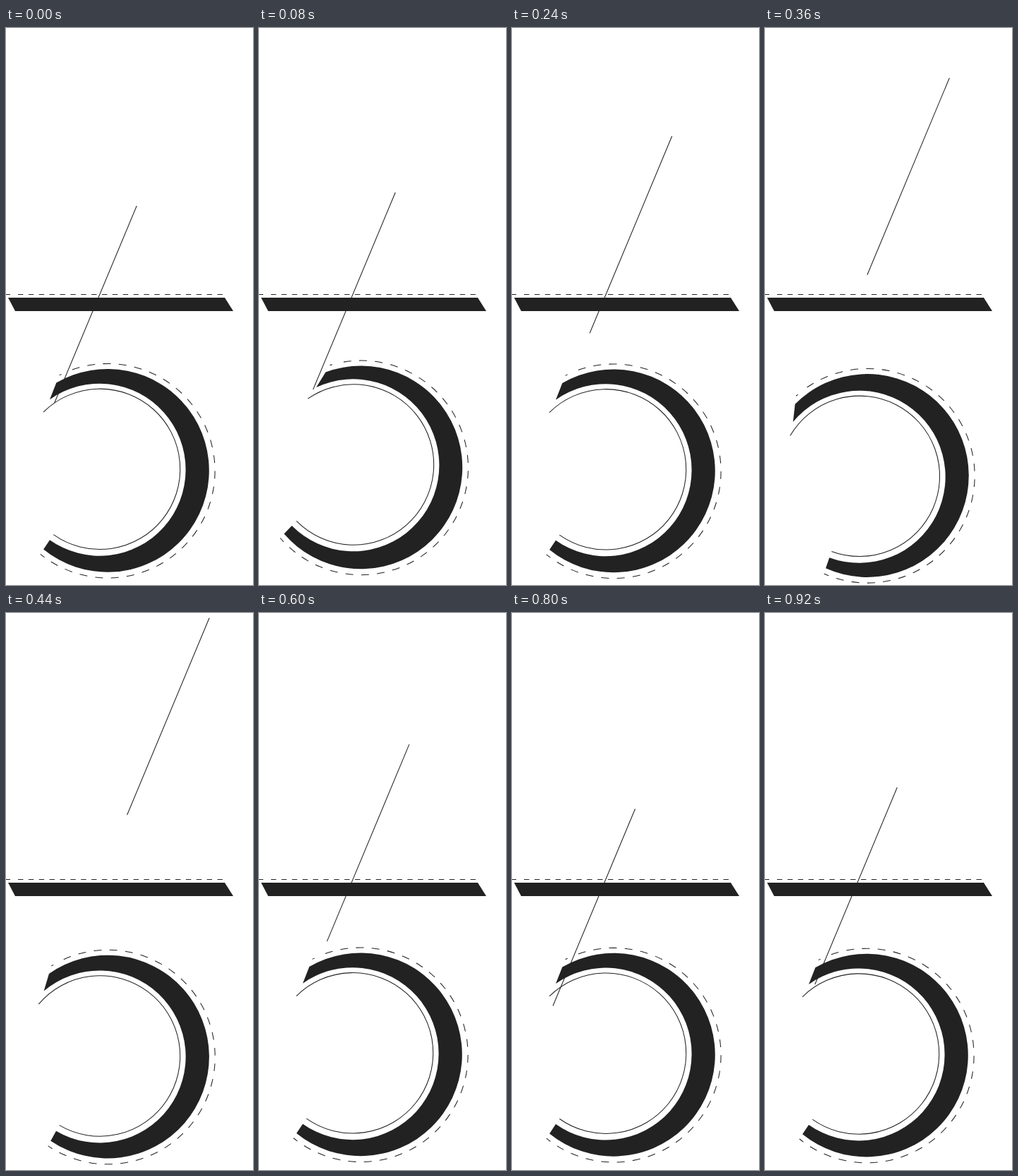
An HTML page that plays this animation: 350x789 px, repeating every 960 ms.

```html
<!DOCTYPE html>
<html lang="en">
<head>
<meta charset="utf-8">
<title>Recoil</title>
<style>
  html, body { margin: 0; width: 100%; height: 100%; overflow: hidden; background: #fff; }
  svg { display: block; width: 100vw; height: 100vh; }
  .thin { fill: none; stroke: #222; stroke-width: 1.05; }
  .solid { fill: #222; }
</style>
</head>
<body>
<svg viewBox="0 0 350 789">
  <path id="rod" class="thin" d="M185.2 252L68.7 531"/>

  <path class="solid" d="M3 382H310L322 401H13Z"/>
  <path class="thin" d="M0 377.5H6"/>
  <path class="thin" stroke-dasharray="7.4 7.47" d="M17 377.5H307.5"/>

  <g id="ring">
    <path class="solid" d="M71.3 502.8A143.9 143.9 0 1 1 53.1 738.7L62 725.4A122 122 0 1 0 62 526.4Z"/>
    <path class="thin" d="M53 544.3A113.7 113.7 0 1 1 67.3 717.8"/>
    <path class="thin" d="M75.6 492.1L78.7 490.6"/>
    <path class="thin" stroke-dasharray="11 11.28" d="M93.9 484.3A151.8 151.8 0 1 1 48.8 745.5"/>
  </g>
</svg>
<script>
  const LOOP = 960, STEP = 40, TAU = 2 * Math.PI;
  const rod = document.getElementById('rod');
  const ring = document.getElementById('ring');

  const pull = u => u ** 1.5;
  const soft = u => 0.6 * u + 0.4 * u * u * (3 - 2 * u);
  const tween = (t, t0, t1, a, b, ease) => a + (b - a) * ease((t - t0) / (t1 - t0));

  // The rod is drawn up, shot back past its rest, then settles.
  function rodShift(t) {
    if (t < 440) return tween(t, 0, 440, 0, -245, pull);
    if (t < 720) return tween(t, 440, 720, -245, 61, soft);
    if (t < 880) return tween(t, 720, 880, 61, -10, soft);
    return tween(t, 880, LOOP, -10, 0, soft);
  }

  // One triangle wave of 15 degrees either way, then rest.
  const turn = t => t < 480 ? 60 / TAU * Math.asin(Math.sin(TAU * t / 480)) : 0;

  // Slow float of the ring around its rest height.
  const float = t => 1.1 * Math.cos(TAU * (t - 170) / LOOP) - 0.7;

  function draw(now) {
    const t = Math.floor((now % LOOP) / STEP) * STEP;
    const y = rodShift(t);
    rod.setAttribute('transform', `translate(${-0.42 * y} ${y})`);
    ring.setAttribute('transform', `translate(0 ${float(t)}) rotate(${turn(t)} 172 627)`);
    requestAnimationFrame(draw);
  }
  draw(0);
</script>
</body>
</html>
```
